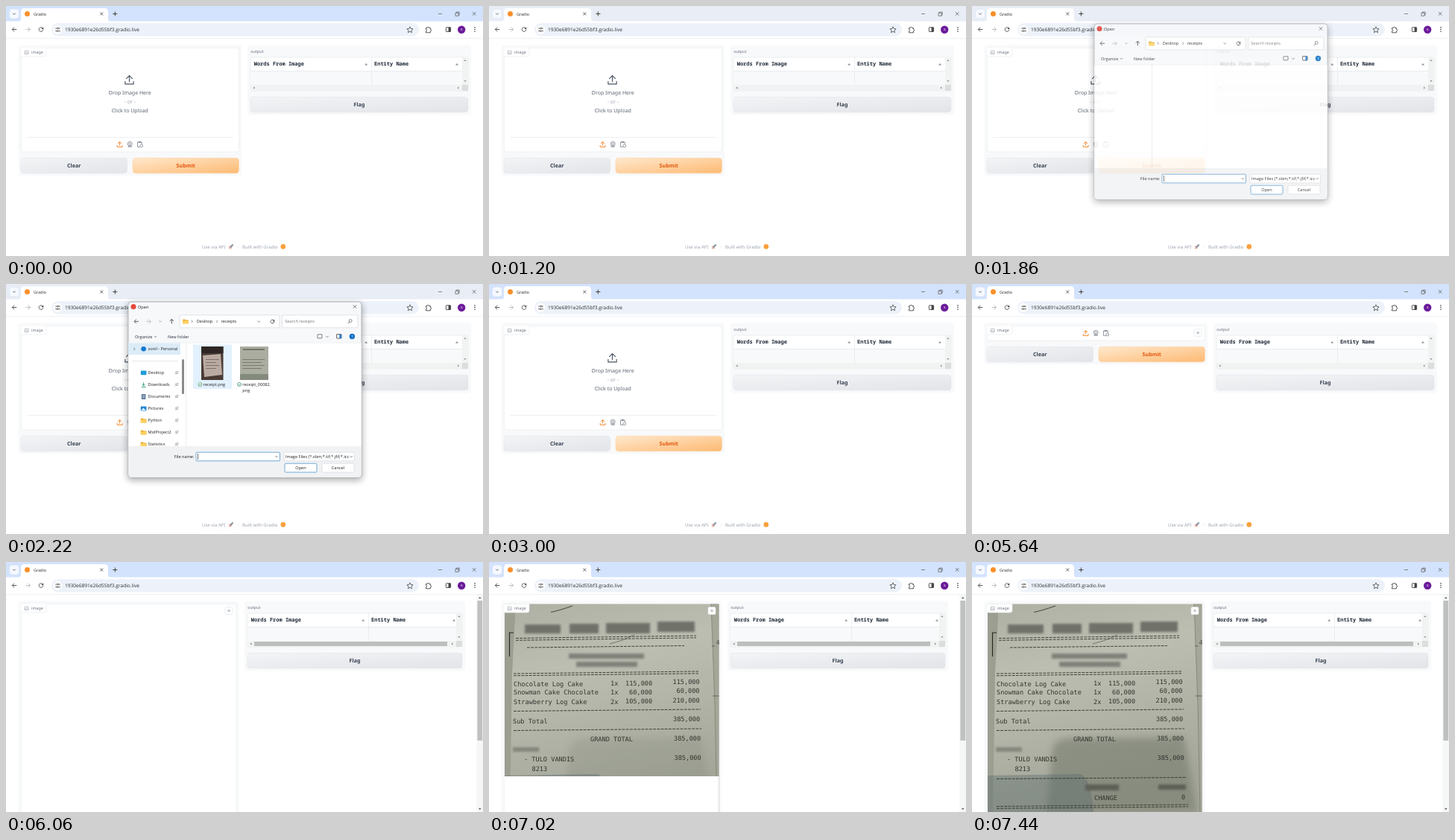
Recreate the animation shown at these times as an HTML page. Size 640 px wide and 336 px high, loop 8000 ms.

```html
<!DOCTYPE html>
<html lang="en">
<head>
<meta charset="utf-8">
<title>Receipt upload</title>
<style>
html, body { margin: 0; width: 100%; height: 100%; overflow: hidden; background: #fff; }
svg { display: block; width: 100vw; height: 100vh; }
text { text-rendering: geometricPrecision; white-space: pre; }
.body { font: 7px "Noto Sans", sans-serif; }
.btn { font: 600 7.1px "Noto Sans", sans-serif; }
.label { font: 5.4px "Noto Sans", sans-serif; }
.foot { font: 6.05px "Noto Sans", sans-serif; }
.head { font: 600 7px "Noto Sans Mono", monospace; }
.url { font: 6.58px "Open Sans", sans-serif; }
.ui { font: 5.6px "Open Sans", sans-serif; }
.till { font: 8.6px "DejaVu Sans Mono", monospace; }
</style>
</head>
<body>
<svg id="stage" viewBox="0 0 640 336" preserveAspectRatio="none">
<defs>
<linearGradient id="grey" x2="1" y2="1"><stop stop-color="#f3f4f6"/><stop offset="1" stop-color="#e2e4e8"/></linearGradient>
<linearGradient id="orange" x2="1" y2="1"><stop stop-color="#ffe8cc"/><stop offset="1" stop-color="#fdba74"/></linearGradient>
<linearGradient id="paper" x2=".25" y2="1"><stop stop-color="#aeb0a3"/><stop offset=".35" stop-color="#bcbeb1"/><stop offset="1" stop-color="#a3a698"/></linearGradient>
<filter id="soft" x="-30%" y="-60%" width="160%" height="220%"><feGaussianBlur stdDeviation="1.8"/></filter>
<filter id="haze" x="-20%" y="-20%" width="140%" height="140%"><feGaussianBlur stdDeviation="5"/></filter>
<clipPath id="photoBox"><rect x="21" y="56.5" width="287.5" height="280"/></clipPath>
<clipPath id="navBox"><rect x="164" y="79" width="72" height="139"/></clipPath>
</defs>
</svg>
<script>
const LOOP = 8000;
const rect = (x, y, w, h, fill, more = '') =>
  `<rect x="${x}" y="${y}" width="${w}" height="${h}" fill="${fill}" ${more}/>`;
const disc = (x, y, r, fill, more = '') =>
  `<circle cx="${x}" cy="${y}" r="${r}" fill="${fill}" ${more}/>`;
const line = (d, color = '#474747', w = 0.9, more = '') =>
  `<path d="${d}" fill="none" stroke="${color}" stroke-width="${w}" ${more}/>`;
const shape = (d, fill) => `<path d="${d}" fill="${fill}"/>`;
const text = (x, y, s, cls, fill, anchor = 'start') =>
  `<text x="${x}" y="${y}" class="${cls}" fill="${fill}" text-anchor="${anchor}">${s}</text>`;
const group = (id, inner, more = '') => `<g id="${id}" ${more}>${inner}</g>`;
const at = (x, y, inner) => `<g transform="translate(${x} ${y})">${inner}</g>`;
const edge = (color, r = 0, w = 0.6) => `stroke="${color}" stroke-width="${w}" rx="${r}"`;

const chevron = (x, y, c = '#555') => line(`M${x - 1.7} ${y - 0.8}l1.7 1.7 1.7-1.7`, c, 0.7);
const next = (x, y, c = '#555') => line(`M${x - 0.8} ${y - 1.7}l1.7 1.7-1.7 1.7`, c, 0.7);
const cross = (x, y, r, c, w = 0.8) =>
  line(`M${x - r} ${y - r}l${2 * r} ${2 * r}m0 ${-2 * r}l${-2 * r} ${2 * r}`, c, w);
const arrow = (x, y, dir, c) => line(
  `M${x - 3 * dir} ${y}h${6 * dir}m${-2.8 * dir}-2.8l${2.8 * dir} 2.8l${-2.8 * dir} 2.8`, c);
const reload = (x, y, r, c = '#474747') =>
  line(`M${x + r} ${y}a${r} ${r} 0 1 1 ${-r * 0.35} ${-r * 0.75}`, c) +
  shape(`M${x + r + 0.4} ${y - r - 0.4}v2.8h-2.8z`, c);
const tri = (x, y, turn, s = 1.7, c = '#555') =>
  `<path transform="translate(${x} ${y}) rotate(${turn})" d="M0 ${-s * 0.6}L${s} ${s * 0.6}H${-s}z" fill="${c}"/>`;

function browser() {
  return rect(0, 0, 640, 21, '#d3e3fd') +
    group('inactive', rect(0, 0, 640, 21, '#e9eef6')) +
    rect(4.5, 4, 13, 13, '#f5f9ff', edge('#d5dfee', 4)) + chevron(11, 10.5, '#222') +
    shape('M16 21q4 0 4-4V8q0-5 5-5H132q5 0 5 5v9q0 4 4 4z', '#fff') +
    disc(28.5, 10.5, 3.5, '#f9902b') + text(37, 12.7, 'Gradio', 'label', '#333') +
    cross(128.3, 10.5, 1.9, '#333') + line('M143.3 10.5h6m-3-3v6', '#333') +
    line('M580 10.5h5', '#555', 0.7) +
    line('M603 9.3h4v4h-4zM604.2 9.3v-1.2h4v4h-1.2', '#555', 0.7) +
    cross(628.2, 10.4, 2.2, '#444', 0.7) +
    rect(0, 20.5, 640, 23, '#fff') + rect(0, 43, 640, 0.6, '#e3e8ef') +
    arrow(11.3, 31.5, -1) + arrow(29.5, 31.5, 1, '#b4b7bb') + reload(47, 31.5, 2.8) +
    rect(61, 23, 493, 17.5, '#edf2fa', 'rx="8.7"') + disc(69.2, 31.7, 6, '#fff') +
    line('M66.3 30h2.4m2 0h2M66.3 33.6h1.8m2.2 0h2.6', '#444') +
    disc(69.8, 30, 1, '#fff', 'stroke="#444" stroke-width=".7"') +
    disc(69, 33.6, 1, '#fff', 'stroke="#444" stroke-width=".7"') +
    text(79, 34, '1930e6891e26d55bf3.gradio.live', 'url', '#2b2d30') +
    line('M542 27.8l1.2 2.7 2.9.3-2.2 2 .6 2.9-2.5-1.5-2.5 1.5.6-2.9-2.2-2 2.9-.3z', '#444', 0.8) +
    line('M563.5 29.5h1.7a1.2 1.2 0 1 1 2.4 0h1.8v1.9a1.2 1.2 0 1 1 0 2.4v2h-5.9v-2a1.2 1.2 0 1 0 0-2.4z', '#444') +
    rect(590.4, 28.7, 6.2, 5.8, 'none', edge('#444', 0.6, 0.9)) + rect(593.6, 28.7, 3, 5.8, '#444') +
    disc(611.2, 31.7, 5.2, '#6b1b9a') + text(611.2, 33.4, 's', 'label', '#fff', 'middle') +
    [28.9, 31.6, 34.3].map(y => disc(629, y, 0.8, '#444')).join('');
}

const button = (x, y, w, s, fill, ink, rim) =>
  rect(x, y, w, 20.5, `url(#${fill})`, edge(rim, 4)) + text(x + w / 2, y + 12.8, s, 'btn', ink, 'middle');
const greyButton = (x, y, w, s) => button(x, y, w, s, 'grey', '#374151', '#e1e4e8');
const upload = (c, w) => line('M-2.6 -.9L0-3.5 2.6-.9M0-3.5V1.6M-3.4 1v2.4H3.4V1', c, w);

const tag = () => shape('M20.3 56.3H54V65q0 3-3 3H20.3z', '#fff') +
  line('M54 56.3V65q0 3-3 3H20.3', '#e5e7eb', 0.6) +
  rect(25.2, 60.2, 4.8, 4.4, 'none', edge('#8b919c', 0.5)) +
  line('M25.4 64l1.7-1.8 1.1 1 .7-.6 1 1', '#8b919c', 0.5) +
  text(34, 64.4, 'image', 'label', '#6b7280');

const closeBox = x => rect(x - 5, 60.5, 10, 10, '#fff', edge('#dfe2e6', 1.6)) + cross(x, 65.5, 1.4, '#6b7280', 0.7);

function tools(y) {
  return at(152.6, y, upload('#f08a33', 1)) +
    at(166.2, y, disc(0, -0.7, 3, 'none', 'stroke="#7b828d" stroke-width=".8"') +
      disc(0, -0.7, 1.3, 'none', 'stroke="#7b828d" stroke-width=".7"') + line('M-2.4 3.3h4.8l-1-1.5h-2.8z', '#7b828d', 0.7)) +
    at(179.7, y, line('M.2 3.4H-3.2V-3H2.6v2.6M-1.6-3.8H1v1.5h-2.6z', '#7b828d', 0.8) +
      disc(2, 1.9, 1.9, '#fff', 'stroke="#7b828d" stroke-width=".8"'));
}

// Upload form whose image block ends at y
function form(id, y, inner) {
  return group(id, rect(16.5, 52.5, 299.5, y - 20.5, '#f8f9fa', 'rx="4"') +
    rect(20.3, 56.3, 292.4, y - 56.3, '#fff', edge('#e5e7eb', 3)) +
    inner + tag() + tools(y - 10) +
    greyButton(20, y + 8.3, 142.5, 'Clear') +
    button(170, y + 8.3, 142.5, 'Submit', 'orange', '#e2580f', '#fdd3a5'));
}

const rule = y => rect(28, y, 277, 0.6, '#e2e5e9');
const forms = () =>
  form('idle', 196, at(165.5, 99.3, `<g transform="scale(1.65)">${upload('#4b5563', 0.7)}</g>`) +
    text(166.3, 118.6, 'Drop Image Here', 'body', '#5b6370', 'middle') +
    text(166.3, 130.6, '- or -', 'body', '#9ca3af', 'middle') +
    text(166.3, 142.6, 'Click to Upload', 'body', '#5b6370', 'middle') + rule(176.3)) +
  form('busy', 156, text(166.5, 90, 'Uploading 1 file...', 'body', '#4b5563', 'middle') +
    disc(132.6, 102, 2.9, 'none', 'stroke="#f08a33" stroke-width="1.1"') +
    text(139, 104.5, 'receipt_00082.png', 'body', '#8f96a1') + rule(136.3)) +
  form('bare', 76, closeBox(303.2));

// Result table; thumb adds a horizontal scroll handle
function output(id, x, w, split, thumb) {
  const r = x + w, bar = r - 8;
  return group(id, rect(x - 4, 52.5, w + 8, 94, '#f8f9fa', 'rx="4"') +
    text(x + 0.3, 62.5, 'output', 'label', '#6b7280') +
    rect(x, 69, w, 45, '#fff', edge('#e2e5e9', 2)) +
    rect(x, 87, w - 8, 19, '#f8f9fb') + rect(x, 87, w - 8, 0.6, '#e2e5e9') +
    rect(split, 69, 0.6, 37, '#e2e5e9') +
    rect(bar, 69.2, 8, 36.8, '#f1f2f2') + rect(x, 106, w - 8, 8, '#f1f2f2') + rect(bar, 106, 8, 8, '#dcdddd') +
    (thumb ? rect(x + 9, 107, w - 29, 6, '#bdbebe') : '') +
    text(x + 4.7, 80.3, 'Words From Image', 'head', '#1f2937') +
    text(split + 4, 80.3, 'Entity Name', 'head', '#1f2937') +
    tri(split - 6.8, 78.2, 0, 2, '#8a9099') + tri(bar - (thumb ? 3 : 7), 78.2, 0, 2, '#8a9099') +
    tri(bar + 4, 73, 0, 1.5, '#8b8b8b') + tri(bar + 4, 101, 180, 1.5, '#8b8b8b') +
    tri(x + 4.6, 110, -90, 1.5, '#777') + tri(bar - 5, 110, 90, 1.5, '#777') +
    greyButton(x, 122.3, w, 'Flag'));
}

const footer = () => group('footer',
  text(263, 325.8, 'Use via API', 'foot', '#9ca3af') +
  at(302, 323.4, shape('M3.2-3.3Q.2-3-1.8.6L-.6 1.8Q3-.2 3.2-3.3z', '#8795a5') +
    shape('M-1.2-.9L-3.2.2-2 .8zM.9 1.2L-.2 3.2-.8 2zM-1.9 1L-3.2 3.2-1 1.9z', '#d9482f')) +
  text(310.2, 325.8, '·', 'foot', '#9ca3af') +
  text(317, 325.8, 'Built with Gradio', 'foot', '#9ca3af') + disc(371.8, 323.4, 3.3, '#f9a03c'));

function receipt() {
  const ink = '#33352f';
  const dash = (x1, y1, x2, y2, twin) => [0, 2.8].slice(0, twin ? 2 : 1).map(k =>
    line(`M${x1} ${y1 + k}L${x2} ${y2 + k}`, ink, 0.9, 'stroke-dasharray="3.8 1.4"')).join('');
  const blur = (x, y, w, h, c = '#70726a') => rect(x, y, w, h, c, 'filter="url(#soft)"');
  const row = (y, ...cells) => cells.map(([x, s, up = 0]) => text(x, y - up, s, 'till', ink)).join('');
  return group('photo', rect(21, 56.5, 287.5, 280, 'url(#paper)') +
    shape('M21 56.5H36L31 150 28 336H21z', '#9b9e90') +
    shape('M298 56.5H308.5V336H306L303 190z', '#a4a698') +
    line('M298 56.5L303 190 306 336', '#7d8075', 0.8) +
    line('M300 180h8.5M299 113h4', '#50534a', 0.8) + text(304.5, 111, '4', 'till', '#50534a') +
    line('M33 95H27.5V127', '#24261f', 1.1) +
    line('M83 67.5Q95 65 112 59', '#4d5047', 1.2) + line('M162 110Q180 106 195 98', '#75786d', 1) +
    group('shade', shape('M108 250Q112 238 130 237L285 236 302 336H100z', '#777b6e'),
      'filter="url(#haze)" opacity=".6"') +
    shape('M21 287L145 285Q160 289 163 336H21z', 'rgba(93,108,112,.42)') +
    blur(48, 84, 48, 12) + blur(108, 83, 39, 13) + blur(157, 82, 59, 14) + blur(226, 80, 50, 14) +
    blur(107, 123, 101, 7, '#80827a') + blur(117, 134, 82, 7, '#80827a') +
    blur(32, 249, 35, 6, '#84867c') + blur(152, 299, 45, 8, '#5d6057') + blur(250, 299, 37, 7, '#5d6057') +
    dash(36, 102.5, 278, 99, 1) + dash(51, 115, 262, 112.5) + dash(33, 150, 281, 147, 1) +
    dash(33, 200.5, 284, 198) + dash(33, 226.5, 285, 224) + dash(33, 291.5, 288, 289.5) + dash(33, 328.5, 290, 326, 1) +
    row(166.6, [33, 'Chocolate Log Cake'], [163, '1x', 0.3], [183, '115,000', 0.9], [246.5, '115,000', 2.5]) +
    row(178.2, [33, 'Snowman Cake Chocolate'], [163, '1x', 0.3], [188, '60,000', 0.6], [251.5, '60,000', 2]) +
    row(191, [33, 'Strawberry Log Cake'], [163, '2x', 0.3], [183, '105,000', 0.7], [246.5, '210,000', 2]) +
    row(216.6, [32, 'Sub Total'], [247, '385,000', 2.5]) +
    row(241.4, [136, 'GRAND TOTAL'], [248, '385,000', 1.3]) +
    row(268.2, [47, '- TULO VANDIS'], [248.5, '385,000', 2.2]) + row(281.4, [57.5, '8213']) +
    row(319.5, [164, 'CHANGE'], [281, '0', 0.7]), 'clip-path="url(#photoBox)"');
}

const result = () => group('wide',
  rect(16.5, 52.5, 296, 290, '#f8f9fa', 'rx="4"') + rect(20.3, 56.3, 288.6, 290, '#fff', edge('#e5e7eb', 3)) +
  receipt() + group('rest', rect(20.7, 288, 287.8, 48, '#fff')) + tag() + closeBox(299) +
  rect(631.5, 44, 8.5, 292, '#f5f6f6') + rect(632.4, 52, 6.8, 188, '#bfc0c0') +
  tri(635.8, 48, 0, 1.8) + tri(635.8, 332, 180, 1.8));

const folder = (x, y) => shape(`M${x - 3.8} ${y - 2.8}h2.8l1 1h3.8v4.8h-7.6z`, '#e8ab2e') +
  rect(x - 3.8, y - 0.9, 7.6, 3.9, '#ffd262', 'rx=".4"');

function sidebar() {
  const tray = (x, y) => line(`M${x} ${y - 3}v4.4m-2-2l2 2 2-2M${x - 2.8} ${y + 3}h5.6`, '#2a9d74', 1);
  const icons = [
    (x, y) => rect(x - 3.8, y - 2.8, 7.6, 5.6, '#229bd8', 'rx=".6"'),
    tray,
    (x, y) => rect(x - 2.8, y - 3.5, 5.6, 7, '#607d9a', 'rx=".5"') + line(`M${x - 1.6} ${y - 1}h3.2m-3.2 2h3.2`, '#fff', 0.6),
    (x, y) => rect(x - 3.8, y - 3, 7.6, 6, '#2484d0', 'rx=".6"') + shape(`M${x - 3.4} ${y + 2.6}l3-3.6 3.8 3.6z`, '#d8efff'),
  ];
  const names = ['Desktop', 'Downloads', 'Documents', 'Pictures', 'Python', 'MidProject2', 'Statistics'];
  return rect(164, 79.5, 70, 15.5, '#dcecf8') + next(172.2, 87.3) + disc(184.6, 87.3, 3.3, '#1479d1') +
    text(190.5, 89.3, 'sonil - Personal', 'ui', '#222') + rect(169, 103, 62, 0.6, '#d9d9d9') +
    names.map((s, i) => {
      const y = 119.4 + 16 * i;
      return (icons[i] || folder)(184.6, y) + text(190.5, y + 2, s, 'ui', '#222') +
        line(`M227 ${y + 2}l1.4-1.4m-1-1.4l2.4 2.4 .3-1.4 1.2-1.2-1.4-1.4-1.2 1.2z`, '#777', 0.7);
    }).join('');
}

function files() {
  const tick = x => disc(x, 135, 2.5, '#fff', 'stroke="#2f8a57" stroke-width=".7"') +
    line(`M${x - 1.2} 135l.9 1 1.6-1.9`, '#2f8a57', 0.7);
  const rows = (x, w, c) => [0, 1, 2, 3].map(i => rect(x, 101 + i * 4, w - (i % 2) * 4, 0.8, c)).join('');
  return group('hover1', rect(251, 81.5, 52, 59.5, '#e2f1fd')) +
    group('hover2', rect(305, 81.5, 52, 66, '#cfe8fc')) +
    rect(262, 84, 29.5, 45, '#4a3b34') + rect(262, 84, 29.5, 9, '#2e2624') +
    shape('M264 96L288 94 290 122 266 125z', '#b9aaa2') + rows(268, 18, '#6f625c') +
    rect(314, 84, 38, 45, '#aaada0') + rect(318, 87, 29, 2, '#73766c') + rows(317, 30, '#6c6f65') +
    rect(314, 121, 38, 8, '#858a7e') +
    tick(260.5) + text(264.8, 137, 'receipt.png', 'ui', '#222') +
    tick(313) + text(317.3, 137, 'receipt_00082.', 'ui', '#222') + text(317.3, 145.4, 'png', 'ui', '#222');
}

function dialog() {
  const box = (x, y, w, h, rim = '#cfd2d6', r = 1) => rect(x, y, w, h, '#fff', edge(rim, r));
  return group('dialog',
    rect(163, 26, 315, 238, '#000', 'rx="5" opacity=".32" filter="url(#haze)"') +
    rect(164, 24, 313, 236, '#f7f8fa', edge('#8f949b', 4)) +
    disc(171, 30.6, 3.5, '#e5483a') + text(177, 32.7, 'Open', 'ui', '#222') + cross(468, 30.4, 2.2, '#444', 0.7) +
    arrow(175, 50.3, -1, '#555') + arrow(191.3, 50.3, 1, '#b7b9bc') + chevron(207, 50.3, '#888') +
    line('M222.3 53.3v-6m-2.6 2.6l2.6-2.6 2.6 2.6', '#444') +
    box(233, 41.8, 134, 17) + folder(241, 50.3) + next(249.5, 50.3) + text(255.7, 52.4, 'Desktop', 'ui', '#222') +
    next(283, 50.3) + text(288.7, 52.4, 'receipts', 'ui', '#222') + chevron(339.3, 50.3) + reload(357.5, 50.4, 2.4, '#555') +
    box(370.5, 41.8, 101.5, 17) + text(374.3, 52.4, 'Search receipts', 'ui', '#777') +
    disc(462.2, 49.5, 1.9, 'none', 'stroke="#555" stroke-width=".7"') + line('M460.8 51l-2 2', '#555', 0.8) +
    text(173, 72.6, 'Organize', 'ui', '#2a2f3a') + chevron(200.6, 70.7) + text(217, 72.6, 'New folder', 'ui', '#2a2f3a') +
    rect(418, 67.8, 6, 5, '#fff', edge('#555', 0.4, 0.8)) + chevron(431, 70.7) +
    rect(443.6, 67.6, 6.4, 5.4, '#fff', edge('#333', 0.4, 0.8)) + rect(447.3, 67.6, 2.7, 5.4, '#2f7fce') +
    disc(464.4, 70.5, 3.7, '#0b6fc4') + text(464.4, 72.5, '?', 'ui', '#fff', 'middle') +
    rect(164.3, 79, 312.4, 139, '#fff') + rect(164.3, 78.8, 312.4, 0.5, '#e1e3e6') +
    group('nav', `<g clip-path="url(#navBox)">${sidebar()}</g>` + rect(236, 101, 3, 47, '#8a8a8a', 'rx="1.5"')) +
    rect(241, 79, 0.6, 139, '#e3e3e3') + group('files', files()) +
    shape('M164.3 218H476.7V256q0 3.7-3.7 3.7H168q-3.7 0-3.7-3.7z', '#f1f2f4') +
    text(252.5, 234, 'File name:', 'ui', '#222', 'end') +
    box(255, 226.2, 112.5, 11.6, '#1673bd') + chevron(363, 232) +
    group('caret', rect(257, 228, 0.6, 8, '#111')) +
    group('name', text(257.2, 234, 'receipt_00082.png', 'ui', '#222')) +
    box(373, 226.2, 94.5, 11.6) + text(375, 234, 'Image Files (*.xbm;*.tif;*.jfif;*.icc', 'ui', '#222') + chevron(463.3, 232) +
    box(374, 241.2, 43, 11.8, '#1673bd', 1.5) + text(395.5, 249, 'Open', 'ui', '#222', 'middle') +
    box(424, 241.2, 43, 11.8, '#cfd2d6', 1.5) + text(445.5, 249, 'Cancel', 'ui', '#222', 'middle'));
}

document.getElementById('stage').insertAdjacentHTML('beforeend',
  rect(0, 0, 640, 336, '#fff') + forms() + output('narrow', 328, 292, 490, false) + footer() +
  result() + output('shifted', 324, 288, 486, true) + browser() + dialog());

// id: [time, opacity] steps
const steps = {
  inactive: [[0, 0], [1200, 1], [2940, 0]],
  idle: [[0, 1], [3300, 0]],
  busy: [[0, 0], [3300, 1], [5640, 0]],
  bare: [[0, 0], [5640, 1], [6060, 0]],
  narrow: [[0, 1], [6060, 0]],
  footer: [[0, 1], [6060, 0]],
  wide: [[0, 0], [6060, 1]],
  shifted: [[0, 0], [6060, 1]],
  photo: [[0, 0], [7020, 1]],
  shade: [[0, 0.2], [7380, 0.6]],
  rest: [[0, 1], [7380, 0]],
  dialog: [[0, 0], [1800, 0.4], [1860, 0.85], [1920, 1], [2880, 0.5], [2940, 0]],
  nav: [[0, 0], [1920, 1]],
  files: [[0, 0], [2040, 1]],
  hover1: [[0, 0], [2160, 1], [2580, 0]],
  hover2: [[0, 0], [2580, 1]],
  caret: [[0, 1], [2640, 0]],
  name: [[0, 0], [2640, 1]],
};
for (const [id, list] of Object.entries(steps)) {
  const frames = [...list, [LOOP, list[list.length - 1][1]]].map(([t, opacity]) =>
    ({ offset: t / LOOP, opacity, easing: 'step-end' }));
  document.getElementById(id).animate(frames, { duration: LOOP, iterations: Infinity });
}
</script>
</body>
</html>
```
